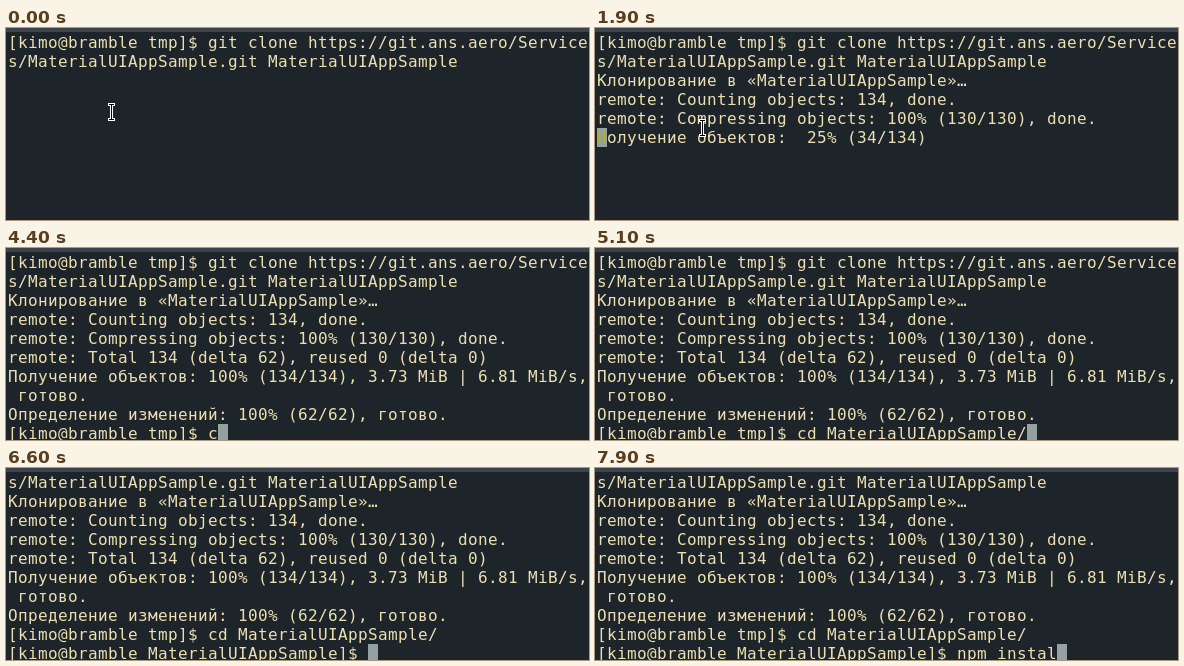
Animation, 583 px wide and 192 px high, one loop 8 s. Source, as an HTML page with a canvas:

```html
<!DOCTYPE html>
<html lang="ru">
<head>
<meta charset="utf-8">
<title>Terminal</title>
<style>
html, body { margin: 0; width: 100%; height: 100%; overflow: hidden; background: #1d242a; }
canvas { display: block; width: 583px; height: 192px; }
</style>
</head>
<body>
<canvas id="stage" width="583" height="192"></canvas>
<script>
const ctx = document.getElementById('stage').getContext('2d');
const W = 583, H = 192, LOOP = 8000, TICK = 100, BLINK = 600;
const LEFT = 2, TOP = 5, CELL_W = 10, CELL_H = 19, ASCENT = 15;
const BG = '#1d242a', BAR = '#3d434d', INK = '#ece0b2', CURSOR = '#93a1a1', UNDER = '#b3b02c';

const HOST = '[kimo@bramble ';
const PROMPT = HOST + 'tmp]$ ';
const APP = 'MaterialUIAppSample';
const TOTAL = 134;

const COMMAND = [
  PROMPT + 'git clone https://git.ans.aero/Service',
  's/' + APP + '.git ' + APP
];
const CLONING = 'Клонирование в «' + APP + '»…';
const COUNTED = [
  `remote: Counting objects: ${TOTAL}, done.`,
  'remote: Compressing objects: 100% (130/130), done.'
];
const RESULT = [
  `remote: Total ${TOTAL} (delta 62), reused 0 (delta 0)`,
  `Получение объектов: 100% (${TOTAL}/${TOTAL}), 3.73 MiB | 6.81 MiB/s,`,
  ' готово.',
  'Определение изменений: 100% (62/62), готово.'
];

const progress = (t, from, to) => Math.min(1, Math.max(0, (t - from) / (to - from)));

// First key at `from`, last key at `to`; power > 1 speeds up along the way.
function typed(text, t, from, to, power = 1) {
  if (t < from) return '';
  return text.slice(0, 1 + Math.floor((text.length - 1) * progress(t, from, to) ** power));
}

function cdInput(t) {
  if (t >= 5100) return 'cd ' + APP + '/';
  return typed('cd ', t, 4400, 4500) + typed('Ma', t, 4800, 4900);
}

function receiving(t) {
  const n = 34 + Math.floor((TOTAL - 34) * progress(t, 2000, 2400));
  const percent = String(Math.floor(n * 100 / TOTAL)).padStart(3);
  return `Получение объектов: ${percent}% (${n}/${TOTAL})`;
}

function screenAt(t) {
  const lines = [...COMMAND];
  if (t < 1600) return { lines, row: 1, col: lines[1].length };

  lines.push(CLONING);
  if (t < 1900) return { lines, row: 3, col: 0 };

  lines.push(...COUNTED);
  if (t < 2400) {
    lines.push(receiving(t));
    return { lines, row: 5, col: 0 };
  }

  lines.push(...RESULT);
  if (t >= 2600) lines.push(PROMPT + cdInput(t));
  if (t >= 5400) {
    lines.shift();
    lines.push(HOST + APP + ']$ ' + typed('npm instal', t, 6700, 7900, 1.42));
  }
  return { lines, row: 9, col: (lines[9] || '').length };
}

// Solid while keys are pressed, otherwise blinking since the last restart.
function cursorOn(t) {
  const pressing = (t >= 1500 && t < 1600) || (t >= 4400 && t < 5400) || t >= 6700;
  if (pressing) return true;
  const restart = t < 1500 ? 500 - 2 * BLINK : t < 4400 ? 1600 : 5400;
  return Math.floor((t - restart) / BLINK) % 2 === 0;
}

function rect(color, x, y, w, h) {
  ctx.fillStyle = color;
  ctx.fillRect(x, y, w, h);
}

function drawChar(ch, row, col, color) {
  ctx.fillStyle = color;
  ctx.fillText(ch, LEFT + col * CELL_W, TOP + row * CELL_H + ASCENT);
}

function drawPointer(x, y) {
  rect('#fff', x, y, 7, 3);
  rect('#fff', x, y + 15, 7, 3);
  rect('#fff', x + 2, y, 3, 18);
  rect('#000', x + 1, y + 1, 5, 1);
  rect('#000', x + 1, y + 16, 5, 1);
  rect('#000', x + 3, y + 1, 1, 16);
}

function draw(t) {
  rect(BG, 0, 0, W, H);
  rect(BAR, 0, 0, W, 4);
  ctx.font = '16px "DejaVu Sans Mono", monospace';
  ctx.textBaseline = 'alphabetic';

  const { lines, row, col } = screenAt(t);
  lines.forEach((line, r) => {
    [...line].forEach((ch, c) => drawChar(ch, r, c, INK));
  });

  if (cursorOn(t)) {
    rect(CURSOR, LEFT + col * CELL_W, TOP + row * CELL_H, CELL_W, CELL_H);
    const under = (lines[row] || '')[col];
    if (under) drawChar(under, row, col, UNDER);
  }

  if (t < 100) drawPointer(102, 75);
  else if (t < 2100) drawPointer(104, 91);
  else if (t < 2200) drawPointer(105, 79);
}

const start = performance.now();
function tick() {
  const t = (performance.now() - start) % LOOP;
  draw(Math.floor(t / TICK) * TICK);
  requestAnimationFrame(tick);
}
tick();
</script>
</body>
</html>
```
